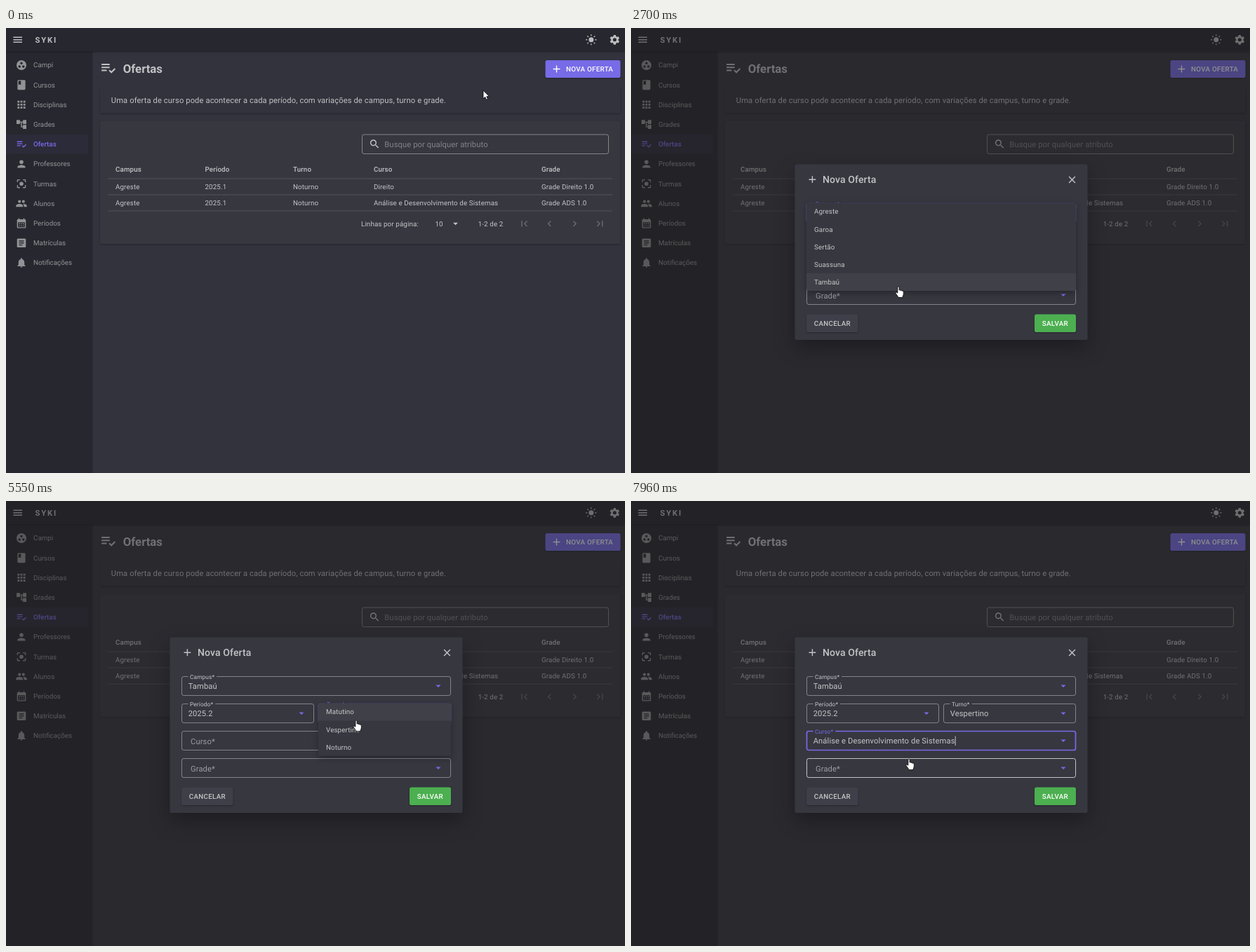
Animation, 882 px wide and 635 px high, one loop 8000 ms. Source, as an HTML page:

```html
<!DOCTYPE html>
<html lang="pt-BR">
<head>
<meta charset="utf-8">
<title>Ofertas</title>
<style>
html, body { margin: 0; width: 100%; height: 100%; overflow: hidden; background: #32333d; }
svg { display: block; width: 100%; height: 100%; font-family: Roboto, sans-serif; }
text { white-space: pre; text-rendering: geometricPrecision; }
.low { filter: drop-shadow(0 1px 1px rgba(0,0,0,.3)); }
.mid { filter: drop-shadow(0 3px 4px rgba(0,0,0,.32)); }
.high { filter: drop-shadow(0 11px 14px rgba(0,0,0,.28)); }
</style>
</head>
<body>
<svg id="stage" viewBox="0 0 882 635">
  <g id="page"></g>
  <rect id="veil" width="882" height="635" fill="#212121"/>
  <g id="dialog"></g>
  <g id="pointer"></g>
</svg>
<script>
const LOOP = 8000, DIALOG_AT = 870, PRIMARY = '#776be7', SURFACE = '#373740', BAR = '#27272f';
const white = a => `rgba(255,255,255,${a})`;
const BRIGHT = white(.7), SOFT = white(.5);
const BODY = 11.2, SMALL = 9.8, TINY = 8.4;
const $ = id => document.getElementById(id);
const clamp = v => Math.max(0, Math.min(1, v));
const ramp = (t, start, span) => clamp((t - start) / span);
const smooth = p => p * p * (3 - 2 * p);
const mix = (a, b, p) => a + (b - a) * p;

const text = (x, y, str, size = SMALL, fill = BRIGHT, weight = 400, gap = .0094) =>
  `<text x="${x}" y="${y}" font-size="${size}" fill="${fill}" font-weight="${weight}" letter-spacing="${gap * size}">${str}</text>`;
const box = (x, y, w, h, fill, r = 0, cls = '') =>
  `<rect x="${x}" y="${y}" width="${w}" height="${h}" rx="${r}" fill="${fill}" class="${cls}"/>`;
// Icons live on a 24-unit grid and are placed by their centre.
const icon = (cx, cy, d, fill, k = .7) =>
  `<path transform="translate(${cx} ${cy}) scale(${k}) translate(-12 -12)" fill-rule="evenodd" fill="${fill}" d="${d}"/>`;
const dot = (x, y, r) => `M${x - r} ${y}a${r} ${r} 0 1 0 ${2 * r} 0a${r} ${r} 0 1 0 ${-2 * r} 0z`;
const cells = (xs, ys, s) => xs.map(x => ys.map(y => `M${x} ${y}h${s}v${s}h${-s}z`).join('')).join('');

const ICON = {
  menu: 'M3 18h18v-2H3zM3 13h18v-2H3zM3 6v2h18V6z',
  campus: dot(12, 12, 10) + dot(8, 15, 2.5) + dot(12, 8, 2.5) + dot(16, 15, 2.5),
  book: 'M18 2H6c-1.1 0-2 .9-2 2v16c0 1.1.9 2 2 2h12c1.1 0 2-.9 2-2V4c0-1.1-.9-2-2-2zM6 4h5v8l-2.5-1.5L6 12z',
  apps: cells([4, 10, 16], [4, 10, 16], 4),
  tree: 'M22 11V3h-7v3H9V3H2v8h7V8h2v10h4v3h7v-8h-7v3h-2V8h2v3z',
  list: 'M3 10h11v2H3zM3 6h11v2H3zM3 14h7v2H3zM20.59 11.93l-4.25 4.24-2.12-2.12-1.41 1.41L16.34 19 22 13.34z',
  person: dot(12, 8, 4) + 'M12 14c-2.67 0-8 1.34-8 4v2h16v-2c0-2.66-5.33-4-8-4z',
  focus: dot(12, 12, 4) + 'M5 15H3v4c0 1.1.9 2 2 2h4v-2H5zM5 5h4V3H5c-1.1 0-2 .9-2 2v4h2zM19 3h-4v2h4v4h2V5c0-1.1-.9-2-2-2zM19 19h-4v2h4c1.1 0 2-.9 2-2v-4h-2z',
  people: dot(16, 8, 3) + dot(8, 8, 3) + 'M8 13c-2.33 0-7 1.17-7 3.5V19h14v-2.5c0-2.33-4.67-3.5-7-3.5zM16 13c-.29 0-.62.02-.97.05 1.16.84 1.97 1.97 1.97 3.45V19h6v-2.5c0-2.33-4.67-3.5-7-3.5z',
  calendar: 'M19 4h-1V2h-2v2H8V2H6v2H5c-1.1 0-2 .9-2 2v14c0 1.1.9 2 2 2h14c1.1 0 2-.9 2-2V6c0-1.1-.9-2-2-2zM19 20H5V10h14z' + cells([7, 11, 15], [12, 16], 2),
  article: 'M19 3H5c-1.1 0-2 .9-2 2v14c0 1.1.9 2 2 2h14c1.1 0 2-.9 2-2V5c0-1.1-.9-2-2-2zM14 17H7v-2h7zM17 13H7v-2h10zM17 9H7V7h10z',
  bell: 'M12 22c1.1 0 2-.9 2-2h-4c0 1.1.89 2 2 2zm6-6v-5c0-3.07-1.64-5.64-4.5-6.32V4c0-.83-.67-1.5-1.5-1.5s-1.5.67-1.5 1.5v.68C7.63 5.36 6 7.92 6 11v5l-2 2v1h16v-1z',
  search: 'M15.5 14h-.79l-.28-.27C15.41 12.59 16 11.11 16 9.5 16 5.91 13.09 3 9.5 3S3 5.91 3 9.5 5.91 16 9.5 16c1.61 0 3.09-.59 4.23-1.57l.27.28v.79l5 4.99L20.49 19zM9.5 14C7.01 14 5 11.99 5 9.5S7.01 5 9.5 5 14 7.01 14 9.5 11.99 14 9.5 14z',
  plus: 'M19 13h-6v6h-2v-6H5v-2h6V5h2v6h6z',
  close: 'M19 6.41L17.59 5 12 10.59 6.41 5 5 6.41 10.59 12 5 17.59 6.41 19 12 13.41 17.59 19 19 17.59 13.41 12z',
  down: 'M7 10l5 5 5-5z',
  up: 'M7 14l5-5 5 5z',
  first: 'M18.41 16.59L13.82 12l4.59-4.59L17 6l-6 6 6 6zM6 6h2v12H6z',
  prev: 'M15.41 7.41L14 6l-6 6 6 6 1.41-1.41L10.83 12z',
  next: 'M10 6L8.59 7.41 13.17 12l-4.58 4.59L10 18l6-6z',
  last: 'M5.59 7.41L10.18 12l-4.59 4.59L7 18l6-6-6-6zM16 6h2v12h-2z'
};

const around = (n, draw) => Array.from({length: n}, (_, i) => `<g transform="rotate(${i * 360 / n})">${draw}</g>`).join('');
const sun = (x, y) => `<g transform="translate(${x} ${y}) scale(.7)"><circle r="5" fill="${BRIGHT}"/>` +
  around(8, `<path d="M0 -8.8V-10" stroke="${BRIGHT}" stroke-width="2" stroke-linecap="round"/>`) + '</g>';
const gear = (x, y) => `<g transform="translate(${x} ${y}) scale(.7)" fill="#bebebf">` +
  '<circle r="5.5" fill="none" stroke="#bebebf" stroke-width="3.8"/>' +
  around(6, '<path d="M-2.9 -6L-2.2 -9.8H2.2L2.9 -6z"/>') + '</g>';

function drawPage() {
  const nav = [['Campi', 'campus'], ['Cursos', 'book'], ['Disciplinas', 'apps'], ['Grades', 'tree'], ['Ofertas', 'list'],
    ['Professores', 'person'], ['Turmas', 'focus'], ['Alunos', 'people'], ['Períodos', 'calendar'],
    ['Matrículas', 'article'], ['Notificações', 'bell']];
  const columns = [156, 283.5, 409, 524, 763];
  const rows = [
    ['Campus', 'Período', 'Turno', 'Curso', 'Grade'],
    ['Agreste', '2025.1', 'Noturno', 'Direito', 'Grade Direito 1.0'],
    ['Agreste', '2025.1', 'Noturno', 'Análise e Desenvolvimento de Sistemas', 'Grade ADS 1.0']];
  let out = box(0, 0, 882, 635, '#32333d') + box(0, 0, 123, 635, BAR, 0, 'low') + box(0, 0, 882, 33.5, BAR, 0, 'low') +
    icon(16.7, 16.8, ICON.menu, BRIGHT) + text(41.5, 20.8, 'SYKI', BODY, BRIGHT, 700, .17) +
    sun(833.8, 16.8) + gear(867.3, 16.8) + box(0, 152, 117, 27.5, 'rgba(119,107,231,.06)');
  nav.forEach(([name, key], i) => {
    const y = 53 + i * 28.2, on = name === 'Ofertas', fill = on ? PRIMARY : SOFT;
    out += icon(22, y, ICON[key], fill) + text(39, y + 3.4, name, SMALL, fill, on ? 500 : 400, 0);
  });
  out += icon(145.6, 57.3, ICON.list, BRIGHT, 1.05) + text(166.7, 64.2, 'Ofertas', 16.8, BRIGHT, 700, 0) +
    box(768.5, 46, 107, 25, PRIMARY, 2.8, 'low').replace('<rect', '<rect id="add"') +
    icon(784.5, 58.5, ICON.plus, '#fff', .7) + text(798, 62, 'NOVA OFERTA', SMALL, '#fff', 500, .0286) +
    box(134, 84, 741.5, 37.5, '#32333d', 2.8, 'low') +
    text(149.8, 106.6, 'Uma oferta de curso pode acontecer a cada período, com variações de campus, turno e grade.', BODY) +
    box(134, 132.5, 741.5, 175.5, SURFACE, 2.8, 'low') +
    `<rect x="507.5" y="152" width="351" height="27.5" rx="2.8" fill="none" stroke="${white(.38)}"/>` +
    icon(525.2, 165.6, ICON.search, BRIGHT) + text(539.3, 169.8, 'Busque por qualquer atributo', BODY, white(.38));
  rows.forEach((row, r) => {
    const y = r ? 207 + r * 23 : 204.8;
    row.forEach((s, c) => out += text(columns[c], y, s, SMALL, BRIGHT, r ? 400 : 500, .0107));
    out += box(145, 214.5 + r * 23, 719, 1, white(.14));
  });
  out += text(506, 282.8, 'Linhas por página:', SMALL, BRIGHT, 400, .0107) + text(611.5, 282.8, '10', SMALL, BRIGHT, 400, .0107) +
    icon(640.5, 279.2, ICON.down, BRIGHT) + text(672.7, 282.8, '1-2 de 2', SMALL, BRIGHT, 400, .0107);
  ['first', 'prev', 'next', 'last'].forEach((k, i) => out += icon(738.5 + i * 35.9, 279.2, ICON[k], white(.26)));
  $('page').innerHTML = out;
}

const FIELD_H = 27, ITEM_H = 25.1, FADE_IN = 230, FADE_OUT = 200, BLUR_DELAY = 300;
const fields = [
  {label: 'Campus*', x: 250.5, y: 250.5, w: 383, focus: DIALOG_AT, open: 2010, pick: 3000, choice: 4, menuY: 249.4,
    items: ['Agreste', 'Garoa', 'Sertão', 'Suassuna', 'Tambaú']},
  {label: 'Período*', x: 250.5, y: 289.5, w: 188, focus: 3690, open: 3690, pick: 4500, choice: 1, menuY: 288.4,
    items: ['2025.1', '2025.2']},
  {label: 'Turno*', x: 445.5, y: 289.5, w: 188, focus: 5220, open: 5220, pick: 6130, choice: 1, menuY: 288.4,
    items: ['Matutino', 'Vespertino', 'Noturno']},
  {label: 'Curso*', x: 250.5, y: 328.5, w: 383, focus: 7000, open: 7000, pick: 7760, choice: 0, menuY: 355.4, marked: true,
    items: ['Análise e Desenvolvimento de Sistemas', 'Direito']},
  {label: 'Grade*', x: 250.5, y: 367.5, w: 383, focus: Infinity, open: Infinity, pick: Infinity, items: []}
];

function measure(str, size) {
  $('pointer').innerHTML = text(0, 0, str, size);
  return $('pointer').firstChild.getComputedTextLength();
}

const within = (p, x, y, w, h) => p.x >= x && p.x <= x + w && p.y >= y && p.y <= y + h;

function drawField(f, t, p, menuOpen) {
  const {x, y, w} = f, r = 2.8;
  const active = t >= f.focus && t < f.pick + BLUR_DELAY, filled = t >= f.pick;
  const rise = f.focus === DIALOG_AT ? 1 : smooth(ramp(t, f.focus, 140));
  const opened = t >= f.open && t < f.pick;
  const hover = !menuOpen && within(p, x, y - .5, w, FIELD_H + 1);
  const stroke = active ? PRIMARY : white(hover ? .7 : .38);
  const left = x + 9, right = rise ? x + 14.5 + f.labelW : left;
  let out = `<path d="M${right} ${y}H${x + w - r}a${r} ${r} 0 0 1 ${r} ${r}V${y + FIELD_H - r}a${r} ${r} 0 0 1 ${-r} ${r}` +
    `H${x + r}a${r} ${r} 0 0 1 ${-r} ${-r}V${y + r}a${r} ${r} 0 0 1 ${r} ${-r}H${left}" fill="none" stroke="${stroke}" stroke-width="${active ? 1.7 : 1}"/>`;
  out += text(mix(x + 12.5, x + 11.5, rise), mix(y + 18, y + 3.2, rise), f.label, mix(BODY, TINY, rise),
    active ? PRIMARY : rise ? BRIGHT : SOFT);
  if (filled) out += text(x + 9.2, y + 17.6, f.items[f.choice], BODY);
  if (active) out += box(x + 9.3 + (filled ? f.valueW : 0), y + 7, 1, 13.5, BRIGHT);
  return out + icon(x + w - 17.5, y + 13.3, opened ? ICON.up : ICON.down, PRIMARY);
}

function drawMenu(f, t, p) {
  const alpha = ramp(t, f.open, FADE_IN) * (1 - ramp(t, f.pick, FADE_OUT));
  if (!alpha) return '';
  const x = f.x - .5, w = f.w + 1, h = f.items.length * ITEM_H;
  let out = `<g opacity="${alpha}">` + box(x, f.menuY, w, h, SURFACE, 2.8, 'mid');
  f.items.forEach((s, i) => {
    const y = f.menuY + i * ITEM_H, marked = f.marked && i === 0;
    const hover = within(p, x, y, w, ITEM_H - .01);
    if (marked || hover) out += box(x, y, w, ITEM_H, marked ? 'rgba(119,107,231,.1)' : white(.045), 1);
    out += text(x + 11, y + 16, s, SMALL, marked ? PRIMARY : BRIGHT, 400, .0107);
  });
  return out + '</g>';
}

function drawDialog(t, p) {
  const menuOpen = fields.some(f => t >= f.open && t < f.pick);
  return box(233.5, 194.5, 417, 250.5, SURFACE, 2.8, 'high') +
    icon(258.4, 216.2, ICON.plus, BRIGHT) + text(273, 221.2, 'Nova Oferta', 14, BRIGHT, 500, .0075) +
    icon(628.5, 216.5, ICON.close, BRIGHT) +
    box(250, 408.5, 73.5, 25.5, '#3e3f48', 2.8, 'low') + text(260.8, 424.8, 'CANCELAR', SMALL, BRIGHT, 500, .0286) +
    box(575, 408.5, 59, 25.5, '#4caf50', 2.8, 'low') + text(585.8, 424.8, 'SALVAR', SMALL, '#fff', 500, .0286) +
    fields.map(f => drawField(f, t, p, menuOpen)).join('') + fields.map(f => drawMenu(f, t, p)).join('');
}

// Pointer stops: time, x, y
const stops = [[40, 680, 89], [700, 822, 60], [950, 822, 60], [1640, 448, 239], [1740, 433, 264], [2050, 433, 264],
  [2690, 381, 369], [3050, 381, 369], [3480, 350, 301], [3860, 350, 301], [4450, 345, 322], [4560, 345, 322],
  [5180, 500, 303], [5330, 500, 303], [5550, 499, 313], [5900, 497, 327], [6180, 497, 327], [6740, 394, 343],
  [7260, 394, 343], [7600, 396, 368]];
const looks = [[560, 'arrow'], [1000, 'hand'], [1670, 'arrow'], [6450, 'hand'], [7330, 'beam'], [LOOP, 'hand']];
const edge = 'fill="#fff" stroke="#000" stroke-width=".8" stroke-linejoin="round"';
const shapes = {
  arrow: `<path ${edge} d="M0 0V11.8L2.7 9.4L4.5 13.3L6.5 12.4L4.8 8.7H8.5z"/>`,
  hand: `<path ${edge} d="M-1.1 1C-1.1 -.3 1.1 -.3 1.1 1V5.2C1.5 4.5 3 4.7 3.2 5.7C3.7 5.1 5 5.4 5.2 6.3C6 5.9 7.3 6.3 7.3 7.5V10.5C7.3 12.6 6 13.4 6 15.6H-.2C-.4 13.4 -3.8 10.6 -4.2 8.8C-4 7.6 -2.2 8 -1.1 9.2z"/>`,
  beam: '<path fill="none" stroke="#e0e0e0" d="M-2.5 -4.5H-.8L.5 -4L1.8 -4.5H3.5M.5 -4.5V5.5M-2.5 5.5H-.8L.5 5L1.8 5.5H3.5"/>'
};

function pointerAt(t) {
  const i = stops.findIndex(s => s[0] > t);
  if (i < 1) {
    const s = i ? stops[stops.length - 1] : stops[0];
    return {x: s[1], y: s[2]};
  }
  const [t0, x0, y0] = stops[i - 1], [t1, x1, y1] = stops[i];
  const k = smooth((t - t0) / (t1 - t0));
  return {x: mix(x0, x1, k), y: mix(y0, y1, k)};
}

function render(t) {
  const p = pointerAt(t), shown = t >= DIALOG_AT;
  $('add').setAttribute('fill', !shown && within(p, 768.5, 46, 107, 25) ? '#6457e4' : PRIMARY);
  $('veil').setAttribute('opacity', .5 * ramp(t, DIALOG_AT, 150));
  const grow = smooth(ramp(t, DIALOG_AT, 120)), scale = mix(.9, 1, grow);
  const dialog = $('dialog');
  dialog.setAttribute('opacity', grow);
  dialog.setAttribute('transform', scale < 1 ? `translate(442 320) scale(${scale}) translate(-442 -320)` : '');
  dialog.innerHTML = shown ? drawDialog(t, p) : '';
  const look = looks.find(l => t < l[0])[1];
  $('pointer').innerHTML = `<g transform="translate(${p.x} ${p.y})">${shapes[look]}</g>`;
}

drawPage();
for (const f of fields) {
  f.labelW = measure(f.label, TINY);
  f.valueW = f.items.length ? measure(f.items[f.choice], BODY) : 0;
}
const start = performance.now();
function tick() {
  render((performance.now() - start) % LOOP);
  requestAnimationFrame(tick);
}
tick();
</script>
</body>
</html>
```
